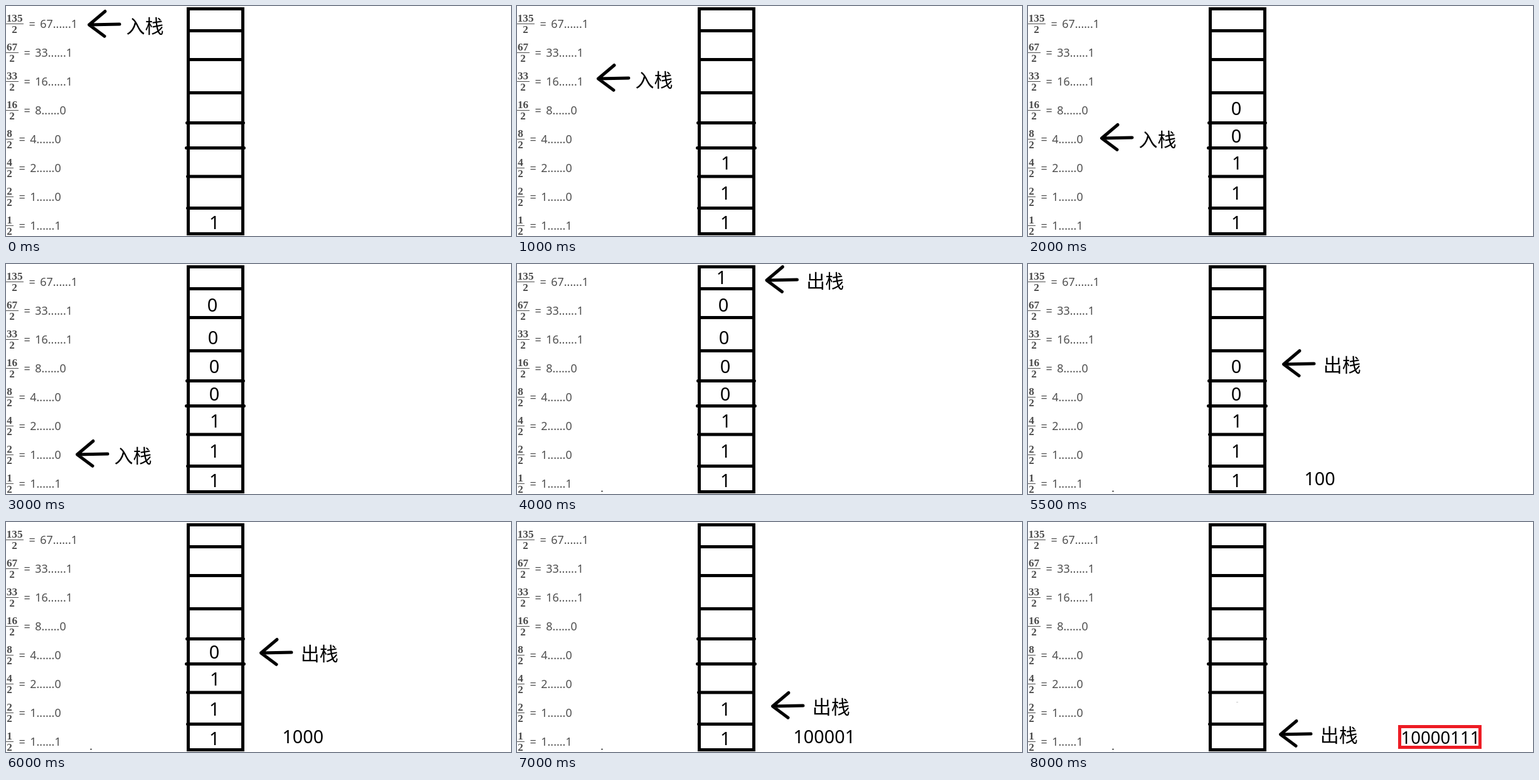
Recreate the animation shown at these times as an HTML page. Size 805 px wide and 367 px high, loop 8500 ms.

```html
<!DOCTYPE html>
<html lang="zh-CN">
<head>
<meta charset="utf-8">
<title>Binary conversion with a stack</title>
<style>
  html, body { margin: 0; width: 100%; height: 100%; overflow: hidden; background: #fff; }
  svg { display: block; width: 805px; height: 367px; }
  text { white-space: pre; }
  .num { font: bold 17.2px "Liberation Serif", serif; fill: #4a4a4a; text-anchor: middle; }
  .eq { font: 18px "Noto Sans", "Open Sans", sans-serif; fill: #4f4f4f; }
  .digit { font: 29px "Noto Sans", "Open Sans", sans-serif; text-anchor: middle; }
  .result { font-family: "Noto Sans", "Open Sans", sans-serif; }
  .label { font: 30px "Noto Sans CJK SC", "Noto Sans CJK", sans-serif; }
  .ink { fill: none; stroke: #000; stroke-width: 5; }
  .round { stroke-linecap: round; stroke-linejoin: round; }
</style>
</head>
<body>
<svg id="stage" viewBox="0 0 805 367" xmlns="http://www.w3.org/2000/svg"></svg>
<script>
const STEP = 500, PUSHES = 8, STEPS = 17;
const stage = document.getElementById('stage');

function add(tag, attrs, text = '', parent = stage) {
  const el = document.createElementNS('http://www.w3.org/2000/svg', tag);
  for (const key in attrs) el.setAttribute(key, attrs[key]);
  el.textContent = text;
  parent.appendChild(el);
  return el;
}

function show(el, on) {
  el.setAttribute('visibility', on ? 'visible' : 'hidden');
}

// Division steps on the left
const divisions = [
  [135, '67......1'], [67, '33......1'], [33, '16......1'], [16, '8......0'],
  [8, '4......0'], [4, '2......0'], [2, '1......0'], [1, '1......1']
];
divisions.forEach(([n, answer], i) => {
  const y = 46 * i, w = 4 + 8 * String(n).length, mid = w / 2 - 0.4;
  add('text', { class: 'num', x: mid, y: y + 25 }, n);
  add('rect', { x: 0, y: y + 28, width: w, height: 1, fill: '#4f4f4f' });
  add('text', { class: 'num', x: mid, y: y + 43 }, 2);
  add('text', { class: 'eq', x: w + 8.6, y: y + 35 }, '=');
  add('text', { class: 'eq', x: w + 26.2, y: y + 35 }, answer);
});

// Stack frame
add('rect', { class: 'ink', x: 290.5, y: 4.5, width: 87, height: 359 });
add('path', { class: 'ink', d: 'M290 39.5H378M290 85.5H378M290 138.5H378' });
add('path', { class: 'ink round', d: 'M288.5 186.5H378.5M287.5 226.5H379.5M289.5 272H377M289.5 322.5H377' });

// Stack cells, top to bottom: bit, centre x, baseline
const cells = [
  [1, 326, 32], [0, 329, 76], [0, 330, 128], [0, 332, 174],
  [0, 332, 217.5], [1, 333.4, 261], [1, 332.4, 308.5], [1, 332.2, 356]
];
const bits = cells.map(cell => cell[0]).join('');
const digits = cells.map(([bit, x, y]) => add('text', { class: 'digit', x, y }, bit));

// Arrow corner for each step
const pushAt = [
  [130, 6], [130, 47], [127, 92], [127, 138], [115, 187], [112, 234], [111, 280], [109, 318]
];
const popAt = [
  [395.5, 2], [400.5, 34], [404, 88], [405, 136], [404, 185], [406, 223], [405, 270], [400, 315]
];
const arrow = add('g', {});
add('path', { class: 'ink round', d: 'M28 2.5L2.5 24L27 42.3M2.5 24L51 23' }, '', arrow);
const label = add('text', { class: 'label' }, '', arrow);

// Specks left behind by erasing
const speck = add('rect', { x: 134, y: 362, width: 3, height: 1 });
const smudge = add('rect', { x: 332, y: 287, width: 3, height: 1, fill: '#c8c8c8' });

const frame = add('rect', {
  x: 592.5, y: 326.5, width: 128, height: 33, fill: 'none', stroke: '#ed1c24', 'stroke-width': 5
});
const result = add('text', { class: 'result' });

function render(time) {
  const step = Math.floor(time / STEP) % STEPS;
  const popped = step - PUSHES;
  const pushing = popped < 0;
  const top = pushing ? PUSHES - 1 - step : popped;
  digits.forEach((el, row) => show(el, row >= top));

  const [x, y] = pushing ? pushAt[step] : popAt[Math.min(popped, 7)];
  arrow.setAttribute('transform', `translate(${x} ${y})`);
  label.textContent = pushing ? '入栈' : '出栈';
  label.setAttribute('x', pushing ? 61.5 : 65.8);
  label.setAttribute('y', pushing ? 37 : 36);

  const moved = popped >= 7;
  result.textContent = bits.slice(0, Math.max(0, popped));
  result.setAttribute('x', moved ? 594.6 : 440.4);
  result.setAttribute('y', moved ? 353.5 : 352.7);
  result.setAttribute('font-size', moved ? 27.5 : 28.8);

  show(speck, !pushing);
  show(smudge, moved);
  show(frame, popped === 8);
}

const start = performance.now();
function tick() {
  render(performance.now() - start);
  requestAnimationFrame(tick);
}
tick();
</script>
</body>
</html>
```
